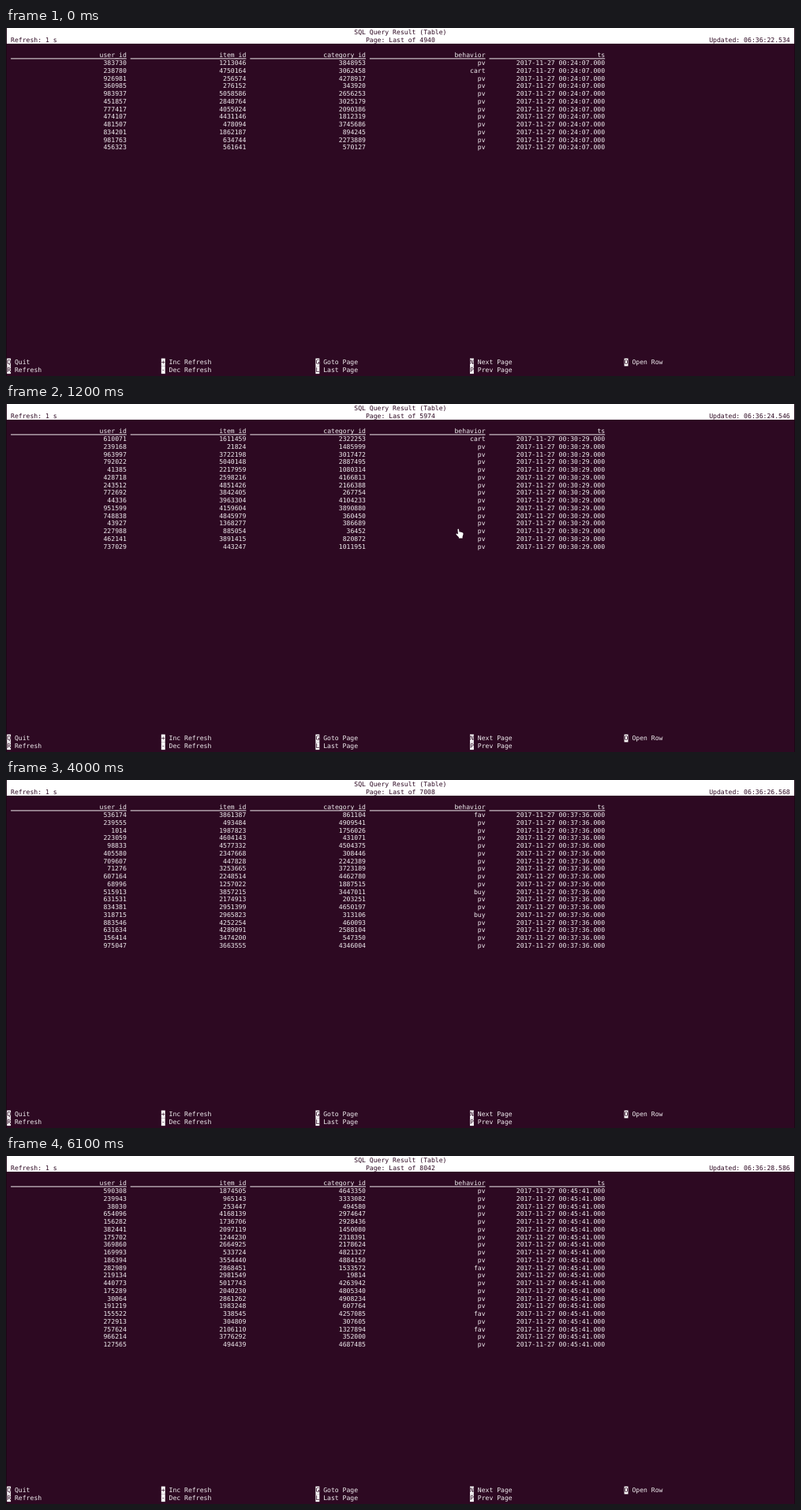
These frames come from a looping animation (1000 px wide and 442 px high, 6200 ms). An HTML page:

```html
<!DOCTYPE html>
<html lang="en">
<head>
<meta charset="utf-8">
<title>SQL Query Result</title>
<style>
html, body { margin: 0; width: 100%; height: 100%; overflow: hidden; background: #2d0922; }
svg { display: block; width: 1000px; height: 442px; }
text {
  font: 8.123px "DejaVu Sans Mono", monospace;
  text-rendering: geometricPrecision;
  white-space: pre;
  fill: #f1edf0;
}
text.dark { fill: #2d0922; }
</style>
</head>
<body>
<svg id="stage" viewBox="0 0 1000 442"></svg>
<script>
const NS = "http://www.w3.org/2000/svg";
const LOOP = 6200, STEP = 100;
const CELL_W = 4.89, CELL_H = 9.75;
const INK = "#2d0922", EDGE = "#1b0614", PAPER = "#ffffff";
const stage = document.getElementById("stage");

const colX = c => 1.2 + c * CELL_W;
const rowY = r => 0.4 + r * CELL_H;
const colEnd = i => 31 * (i + 1);

function add(parent, tag, attrs) {
  const el = document.createElementNS(NS, tag);
  for (const k in attrs) el.setAttribute(k, attrs[k]);
  parent.appendChild(el);
  return el;
}

function rect(x, y, width, height, fill) {
  return add(stage, "rect", { x, y, width, height, fill });
}

function label(parent, col, row, str, dark, end) {
  const el = add(parent, "text", {
    x: colX(col), y: rowY(row) + 7.8,
    "text-anchor": end ? "end" : "start"
  });
  if (dark) el.setAttribute("class", "dark");
  el.textContent = str;
  return el;
}

function seeded(seed) {
  return () => {
    seed = (seed * 1664525 + 1013904223) % 4294967296;
    return seed / 4294967296;
  };
}

// Background and title bar
rect(0, 0, 1000, 442, INK);
rect(0, 0, 1000, rowY(2), PAPER);
rect(0, 0, 1, 442, EDGE);
rect(999, 0, 1, 442, EDGE);
label(stage, 90, 0, "SQL Query Result (Table)", true);
label(stage, 1, 1, "Refresh: 1 s", true);
const pageText = label(stage, 93, 1, "", true);
const timeText = label(stage, 182, 1, "", true);

// Column heads, each 30 cells wide
["user_id", "item_id", "category_id", "behavior", "ts"].forEach((name, i) => {
  label(stage, colEnd(i), 3, name, false, true);
  rect(colX(colEnd(i) - 30), 38.4, 30 * CELL_W, 1, "#efeaee");
});

// Pages grow by three rows; ids are random, "pv" is the usual behavior
const MAX_ID = [1e6, 5.2e6, 5e6];
const pages = [
  { time: "24:07", first: [383730, 1213046, 3848953], odd: { 1: "cart" } },
  { time: "30:29", first: [610071, 1611459, 2322253], odd: { 0: "cart" } },
  { time: "37:36", first: [536174, 3861387, 861104], odd: { 0: "fav", 10: "buy", 13: "buy" } },
  { time: "45:41", first: [590308, 1874505, 4643350], odd: { 10: "fav", 16: "fav", 18: "fav" } }
];
pages.forEach((page, n) => {
  const random = seeded(n + 7);
  page.last = 4940 + 1034 * n;
  page.group = add(stage, "g", {});
  for (let r = 0; r < 12 + 3 * n; r++) {
    const ids = r ? MAX_ID.map(max => Math.floor(random() * max)) : page.first;
    const cells = [...ids, page.odd[r] || "pv", `2017-11-27 00:${page.time}.000`];
    cells.forEach((s, i) => label(page.group, colEnd(i), 4 + r, s, false, true));
  }
});

// Key help
const keys = [
  ["Q Quit", "R Refresh"],
  ["+ Inc Refresh", "- Dec Refresh"],
  ["G Goto Page", "L Last Page"],
  ["N Next Page", "P Prev Page"],
  ["O Open Row"]
];
keys.forEach((pair, i) => pair.forEach((s, j) => {
  const col = 40 * i, row = 43 + j;
  rect(colX(col), rowY(row), CELL_W, CELL_H, PAPER);
  label(stage, col, row, s[0], true);
  label(stage, col + 2, row, s.slice(2));
}));

// Hand pointer and its path: time, x, y
const hand = add(stage, "path", {
  d: "M2.4 1.2Q3.3 0 4 1.2L4.5 4.6L6 4.4L7.6 4.9L9 5.6Q9.7 6.2 9.5 7.5L8.6 10.4V12.6H3.9V11.2L0.6 7.8Q0 6.6 1.2 6.4L3 7.5Z",
  fill: PAPER, stroke: EDGE, "stroke-width": 0.8, "stroke-linejoin": "round",
  "paint-order": "stroke"
});
const path = [
  [300, 862, 444], [1000, 660, 252], [1200, 570, 158], [1300, 570, 158],
  [1500, 566, 64], [1800, 566, 64], [2000, 556, 27], [2200, 552, -16]
];

function pointerAt(t) {
  const i = path.findIndex(p => p[0] >= t);
  if (i < 1) return null;
  const [t0, x0, y0] = path[i - 1], [t1, x1, y1] = path[i];
  const k = (t - t0) / (t1 - t0);
  return [x0 + (x1 - x0) * k, y0 + (y1 - y0) * k];
}

// State after each refresh, one per second from 100 ms on
const seconds = ["22.534", "23.540", "24.546", "25.560", "26.568", "27.579", "28.586"];
const pageOf = [0, 0, 1, 2, 2, 3, 3];

function draw(ms) {
  const t = Math.floor((ms % LOOP) / STEP) * STEP;
  const n = Math.min(6, Math.floor((t + 900) / 1000));
  const page = pages[pageOf[n]];
  for (const p of pages) p.group.setAttribute("display", p === page ? "inline" : "none");
  pageText.textContent = "Page: Last of " + page.last;
  timeText.textContent = "Updated: 06:36:" + seconds[n];
  const pos = pointerAt(t);
  hand.setAttribute("display", pos ? "inline" : "none");
  if (pos) hand.setAttribute("transform", `translate(${pos[0]} ${pos[1]})`);
}

const start = performance.now();
function tick() {
  draw(performance.now() - start);
  requestAnimationFrame(tick);
}
tick();
</script>
</body>
</html>
```
